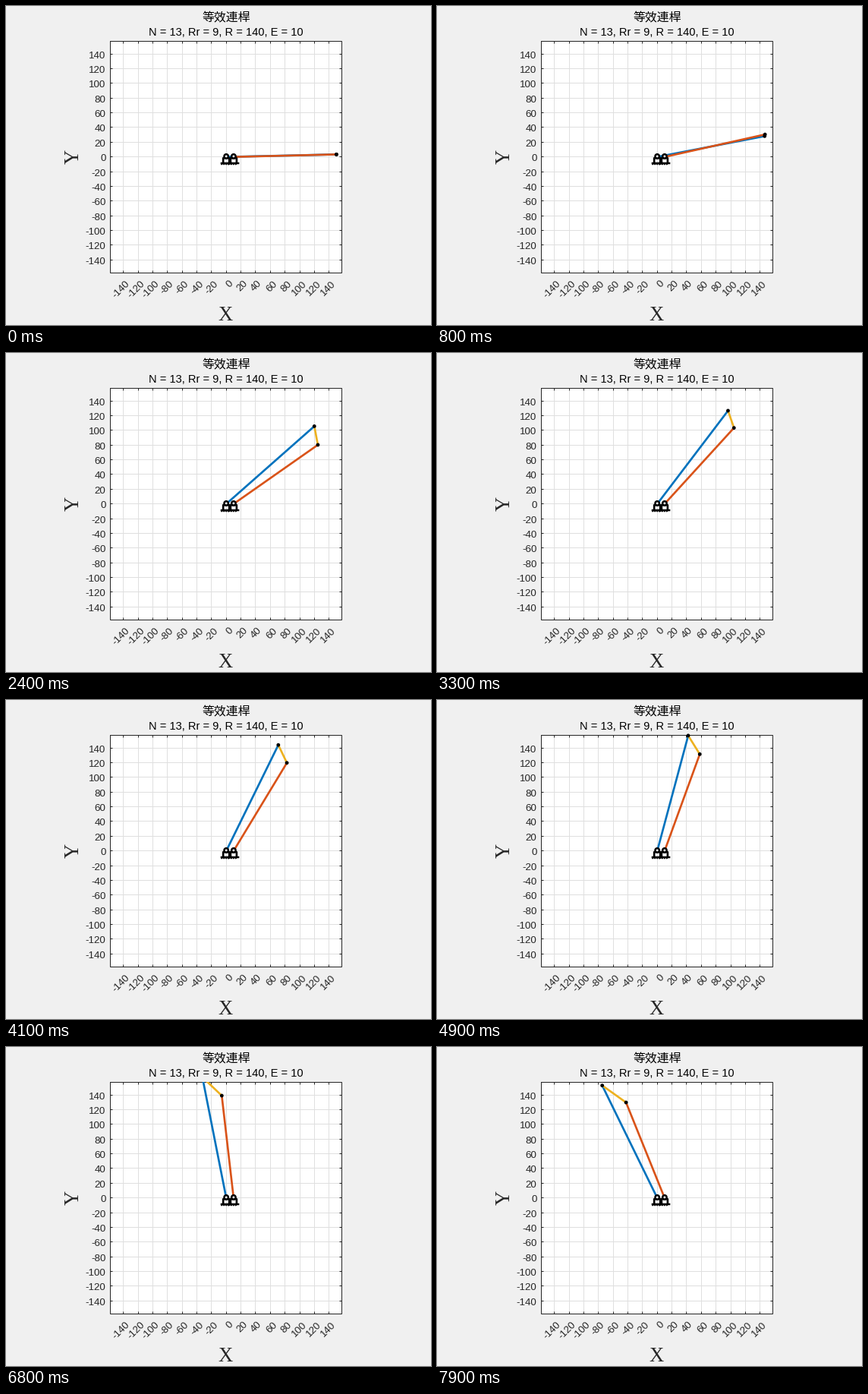
A matplotlib script that plays this animation: 560x420 px, repeating every 8 s.

```python
import numpy as np
import matplotlib.pyplot as plt
from matplotlib.animation import FuncAnimation
from matplotlib.patches import Circle, Rectangle

W, H, DPI = 560, 420, 100
N, RR, R, E = 13, 9, 140, 10
FRAMES, INTERVAL = 80, 100
STEP = np.radians(1.4)

BLUE, ORANGE, YELLOW = "#0072BD", "#D95319", "#EDB120"
INK = "#262626"
LEFT, TOP, SIDE, LIMIT = 137.5, 46.5, 305, 157.5
CX, CY, SCALE = 290.2, 198.7, SIDE / (2 * LIMIT)
BAR = 2.67


def pt(px):
    return px * 72 / DPI


def to_px(p):
    return CX + SCALE * p[0], CY - SCALE * p[1]


fig = plt.figure(figsize=(W / DPI, H / DPI), dpi=DPI, facecolor="#F0F0F0")
ax = fig.add_axes([0, 0, 1, 1])
ax.set(xlim=(0, W), ylim=(H, 0))
ax.axis("off")


def line(x, y, color=INK, width=1, z=2, **kw):
    return ax.plot(x, y, color=color, lw=pt(width), zorder=z, snap=False, **kw)[0]


def label(x, y, text, px, ha="center", font="Liberation Sans", color=INK, rot=0):
    ax.text(x, y, text, fontsize=pt(px), family=font, color=color, ha=ha,
            va="baseline", rotation=rot, rotation_mode="anchor")


def draw_axes():
    right, bottom = LEFT + SIDE, TOP + SIDE
    ax.add_patch(Rectangle((LEFT, TOP), SIDE, SIDE, fc="white", ec="none", zorder=0))
    for v in range(-140, 141, 20):
        x, y = (np.floor(c) + 0.5 for c in to_px((v, v)))
        line([x, x], [TOP, bottom], "#DFDFDF", z=1)
        line([LEFT, right], [y, y], "#DFDFDF", z=1)
        for a, b in ((TOP, TOP + 3), (bottom - 3, bottom)):
            line([x, x], [a, b], solid_capstyle="butt")
        for a, b in ((LEFT, LEFT + 3), (right - 3, right)):
            line([a, b], [y, y], solid_capstyle="butt")
        label(131.5, y + 5.5, str(v), 13.33, ha="right")
        label(x + 9, 366, str(v), 13.33, ha="right", rot=45)
    line([LEFT, right, right, LEFT, LEFT], [TOP, TOP, bottom, bottom, TOP],
         solid_joinstyle="miter")

    label(290, 20, "等效連桿", 15.9, font="Noto Sans CJK JP", color="black")
    label(290, 39, f"N = {N}, Rr = {RR}, R = {R}, E = {E}", 14.67, color="black")
    label(289.5, 414, "X", 26.67, font="Liberation Serif")
    label(96, 198, "Y", 26.67, font="Liberation Serif", rot=90)


def draw_support(x, y):
    """Ground bracket with a pin hole and a hatched base."""
    line([x - 4, x - 4, x + 4, x + 4], [y + 8, y + 1.5, y + 1.5, y + 8],
         "black", 2.6, 5)
    ax.add_patch(Circle((x, y - 0.8), 2.7, fc="white", ec="black",
                        lw=pt(2.5), zorder=6))
    line([x - 6.2, x + 6.2], [y + 8.3, y + 8.3], "black", 2.5, 6)
    for dx in (-4.5, -1.5, 1.5, 4.5):
        line([x + dx, x + dx - 1.6], [y + 8.4, y + 9.8], "black", 1.6, 6)


draw_axes()
for pivot in ((0, 0), (E, 0)):
    draw_support(*to_px(pivot))

window = Rectangle((LEFT, TOP - 0.5), SIDE, SIDE + 1, transform=ax.transData)
bars = [line([], [], c, BAR, z, solid_capstyle="butt")
        for c, z in ((BLUE, 3), (ORANGE, 3.1), (YELLOW, 3.2))]
for bar in bars:
    bar.set_clip_path(window)
joints = [ax.add_patch(Circle((0, 0), 2.4, fc="black", ec="none", zorder=7))
          for _ in range(2)]


def linkage(angle):
    """Pin centre and profile curvature centre (Euler-Savary)."""
    pin = np.array([E + R * np.cos(angle), R * np.sin(angle)])
    pitch = np.array([(N + 1) * E, 0.0])
    ray = pin - pitch
    dist = np.hypot(*ray)
    ray /= dist
    bend = (1 / (N * E) - 1 / ((N + 1) * E)) / -ray[0]
    return pin, pitch + ray / (1 / dist - bend)


def update(i):
    pin, center = linkage(STEP * (i + 1))
    ends = (((0, 0), center), ((E, 0), pin), (pin, center))
    for bar, pair in zip(bars, ends):
        bar.set_data(*zip(*map(to_px, pair)))
    for dot, p in zip(joints, (pin, center)):
        dot.center = to_px(p)
        dot.set_visible(bool(np.all(np.abs(p) <= LIMIT)))
    return bars + joints


anim = FuncAnimation(fig, update, frames=FRAMES, interval=INTERVAL,
                     repeat=True, repeat_delay=0, blit=False)
plt.show()
```
